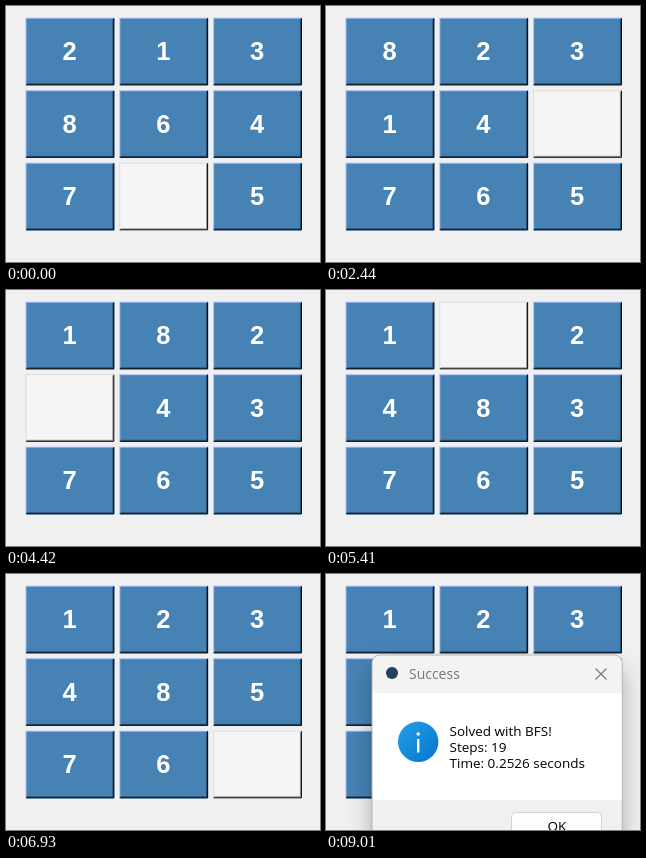
Animation, 314 px wide and 256 px high, one loop 9.08 s. Source, as an HTML page:

```html
<!DOCTYPE html>
<html lang="en">
<head>
<meta charset="utf-8">
<title>Sliding puzzle</title>
<style>
  html, body { margin: 0; width: 100%; height: 100%; overflow: hidden; background: #f0f0f0; }
  svg { display: block; width: 314px; height: 256px; }
  .digit { font: bold 25.5px "Liberation Sans", Arial, sans-serif; fill: #fff; text-anchor: middle; }
  #dialog text { font: 500 13.5px "Open Sans", "Noto Sans", sans-serif; fill: #000; }
  #dialog .title { font-size: 14px; font-weight: 400; fill: #777; }
  #dialog .ok { text-anchor: middle; }
</style>
</head>
<body>
<svg viewBox="0 0 314 256" xmlns="http://www.w3.org/2000/svg">
  <defs>
    <linearGradient id="info" x1="0" y1="0" x2="1" y2="1">
      <stop offset="0" stop-color="#22a0e6"/>
      <stop offset="1" stop-color="#0874cf"/>
    </linearGradient>
    <filter id="shadow" x="-20%" y="-20%" width="140%" height="150%">
      <feDropShadow dx="0" dy="14" stdDeviation="11" flood-opacity=".3"/>
    </filter>
    <clipPath id="frame"><rect x="46" y="81" width="250.3" height="204" rx="8"/></clipPath>
  </defs>
  <rect width="314" height="256" fill="#f0f0f0"/>
  <g id="board"></g>
  <g id="dialog">
    <rect x="46" y="81" width="250.3" height="204" rx="8" fill="#f0f0f0" filter="url(#shadow)"/>
    <g clip-path="url(#frame)">
      <rect x="46" y="81" width="251" height="38" fill="#f3f3f3"/>
      <rect x="46" y="119" width="251" height="107" fill="#fff"/>
    </g>
    <rect x="46" y="81" width="250.3" height="204" rx="8" fill="none" stroke="#a8a8a8" stroke-width=".8"/>
    <circle cx="66" cy="99" r="6" fill="#24405f"/>
    <text class="title" x="83" y="105">Success</text>
    <path d="M269.5 94.5l11 11m0-11l-11 11" stroke="#777" stroke-width="1.1"/>
    <circle cx="92.2" cy="167.8" r="20.2" fill="url(#info)"/>
    <circle cx="92.2" cy="160" r="1.7" fill="#fff"/>
    <path d="M92.2 165v13.5" stroke="#fff" stroke-width="2.4"/>
    <text x="123.5" y="161.5">Solved with BFS!</text>
    <text x="123.5" y="178">Steps: 19</text>
    <text x="123.5" y="194">Time: 0.2526 seconds</text>
    <rect x="185.5" y="238.5" width="90" height="27" rx="4" fill="#fdfdfd" stroke="#d2d2d2"/>
    <text class="ok" x="231" y="256.5">OK</text>
  </g>
</svg>
<script>
const LOOP = 9080, OPENING = 8940, OPEN = 9010;
const START = [2, 1, 3, 8, 6, 4, 7, 0, 5];
const PATH = [4, 1, 0, 3, 4, 5, 2, 1, 0, 3, 4, 1, 2, 5, 8, 7, 4, 5, 8];
const TIMES = [60, 520, 1050, 1510, 1980, 2440, 2970, 3430, 3960, 4420,
  4950, 5410, 5940, 6400, 6930, 7390, 7920, 8380, OPENING];
const BLUE = { face: "#4682b4", light: "#a2c0fc", dark: "#2a4e6c" };
const PALE = { face: "#f5f5f5", light: "#dcdcdc", dark: "#939393" };
const W = 88.8, H = 67.6;

const board = document.getElementById("board");
const dialog = document.getElementById("dialog");

// Each state follows from the last by sliding one tile into the gap.
const states = [START];
for (const to of PATH) {
  const next = states[states.length - 1].slice();
  next[next.indexOf(0)] = next[to];
  next[to] = 0;
  states.push(next);
}

function tile(n, i) {
  const x = 19.5 + 93.8 * (i % 3), y = 11.7 + 72.5 * Math.floor(i / 3);
  const c = n ? BLUE : PALE;
  const rect = (w, h, fill, inset = 0) =>
    `<rect x="${inset}" y="${inset}" width="${w}" height="${h}" fill="${fill}"/>`;
  // Bottom and right edge as one line, so no dark shows at the top left.
  const corner = (inset, color) =>
    `<path d="M${inset} ${H - inset}H${W - inset}V${inset}" fill="none" stroke="${color}"/>`;
  return `<g transform="translate(${x} ${y})">` +
    rect(W, H, c.light) +
    rect(W - 1, H - 1, c.face, 1) +
    corner(1.5, c.dark) +
    corner(0.5, "#000") +
    (n ? `<text class="digit" x="44" y="42.5">${n}</text>` : "") + "</g>";
}

let shown = -1;
function draw(t) {
  const step = TIMES.filter(at => at <= t).length;
  if (step !== shown) {
    board.innerHTML = states[step].map(tile).join("");
    shown = step;
  }
  const opening = t < OPEN;
  dialog.setAttribute("display", t < OPENING ? "none" : "inline");
  dialog.setAttribute("opacity", opening ? 0.5 : 1);
  dialog.setAttribute("transform",
    opening ? "translate(171.5 183) scale(.96) translate(-171.5 -183)" : "");
}

const begin = performance.now();
function tick() {
  draw((performance.now() - begin) % LOOP);
  requestAnimationFrame(tick);
}
draw(0);
requestAnimationFrame(tick);
</script>
</body>
</html>
```
